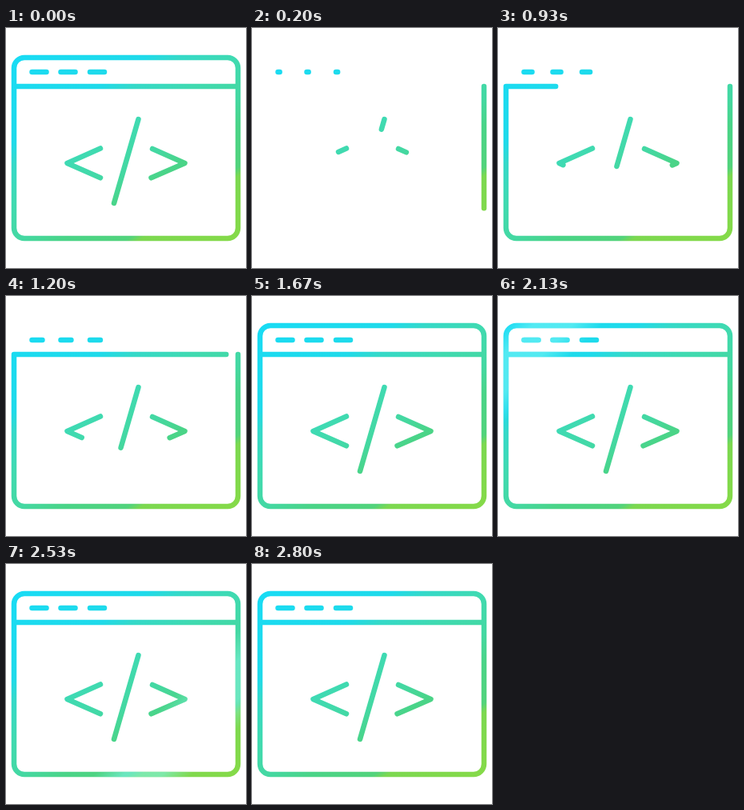
Recreate the animation shown at these times as an HTML page. Size 300 px wide and 300 px high, loop 3.99 s.

```html
<!DOCTYPE html>
<html lang="en">
<head>
<meta charset="utf-8">
<title>Code window</title>
<style>
  html, body { margin: 0; width: 100%; height: 100%; overflow: hidden; background: #fff; }
  svg { display: block; width: 100%; height: 100%; }
  .ink { fill: none; stroke-width: 6.5; stroke-linecap: round; stroke-linejoin: round; }
</style>
</head>
<body>
<svg viewBox="0 0 300 300">
  <defs>
    <linearGradient id="base" gradientUnits="userSpaceOnUse" x1="0" y1="0" x2="210.2" y2="323.4">
      <stop offset="0" stop-color="#16dcf8"/>
      <stop offset=".325" stop-color="#1fdaea"/>
      <stop offset=".385" stop-color="#35d9c8"/>
      <stop offset=".49" stop-color="#40dab0"/>
      <stop offset=".6" stop-color="#44d8a2"/>
      <stop offset=".675" stop-color="#4ad488"/>
      <stop offset=".788" stop-color="#52d37c"/>
      <stop offset=".812" stop-color="#7cd850"/>
      <stop offset="1" stop-color="#86da48"/>
    </linearGradient>
    <linearGradient id="glow" gradientUnits="userSpaceOnUse">
      <stop offset="0" stop-color="#7ff6f4" stop-opacity="0"/>
      <stop offset=".3" stop-color="#7ff6f4" stop-opacity=".55"/>
      <stop offset=".7" stop-color="#7ff6f4" stop-opacity=".55"/>
      <stop offset="1" stop-color="#7ff6f4" stop-opacity="0"/>
    </linearGradient>
    <g id="art">
      <path pathLength="1" d="M290 73V250A13 13 0 0 1 277 263H23A13 13 0 0 1 10 250V73H290V50A13 13 0 0 0 277 37H23A13 13 0 0 0 10 50V73"/>
      <path pathLength="1" d="M32.5 55H50.5"/>
      <path pathLength="1" d="M68.5 55H86.5"/>
      <path pathLength="1" d="M105 55H123"/>
      <path pathLength="1" d="M118 150.5L76.5 169L118 187.3"/>
      <path pathLength="1" d="M165.5 114L135 219"/>
      <path pathLength="1" d="M183 151L223.5 169L181.5 187.3"/>
    </g>
  </defs>
  <use href="#art" class="ink" stroke="url(#base)"/>
  <use id="shine" href="#art" class="ink" stroke="url(#glow)"/>
</svg>
<script>
const LOOP = 3990, FPS = 15, DRAW = 25;
const SWEEP_FROM = 31, SWEEP_TO = 42, BAND = 121;
const art = document.getElementById('art');
const glow = document.getElementById('glow');
const shine = document.getElementById('shine');

function render(t) {
  const step = Math.floor((t + 3.4) * FPS / 1000);

  // strokes trace themselves at a constant rate
  const drawing = step > 0 && step < DRAW;
  art.setAttribute('stroke-dasharray', drawing ? `${step / DRAW} 2` : 'none');

  // diagonal highlight; a point's place along it is x + y
  const sweeping = step >= SWEEP_FROM && step < SWEEP_TO;
  shine.style.display = sweeping ? '' : 'none';
  if (sweeping) {
    const lead = 110 + 55 * (step - SWEEP_FROM);
    const ends = { 1: (lead - BAND) / 2, 2: lead / 2 };
    for (const n in ends) {
      glow.setAttribute('x' + n, ends[n]);
      glow.setAttribute('y' + n, ends[n]);
    }
  }
}

const start = performance.now();
function tick() {
  render((performance.now() - start) % LOOP);
  requestAnimationFrame(tick);
}
tick();
</script>
</body>
</html>
```
